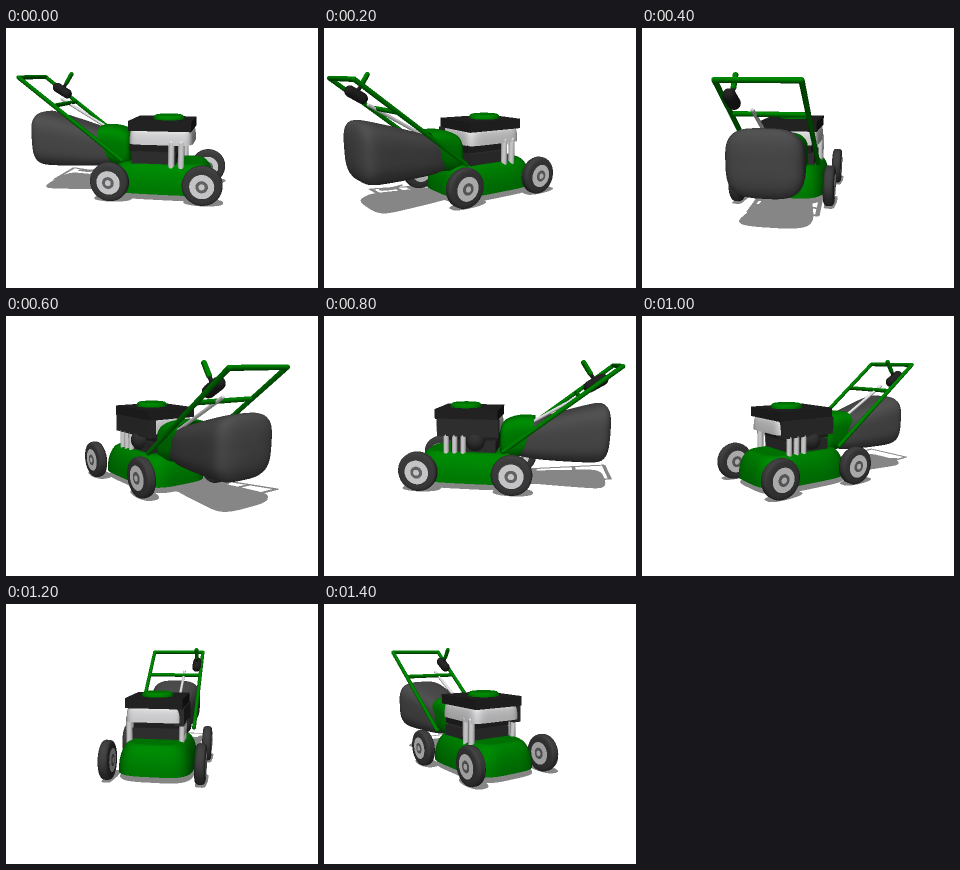
An HTML page with a canvas for the animation above (1.6 s loop, 312x260 px).

```html
<!DOCTYPE html>
<html lang="en">
<head>
<meta charset="utf-8">
<title>Turning lawn mower</title>
<style>
html, body { margin: 0; width: 100%; height: 100%; overflow: hidden; background: #fff; }
canvas { display: block; width: 312px; height: 260px; }
</style>
</head>
<body>
<canvas id="stage" width="312" height="260"></canvas>
<script>
(() => {
const W = 312, H = 260, SS = 2, POSES = 8, HOLD = 200;
const GREEN = [0, 142, 4], SILVER = [240, 240, 242], grey = v => [v, v, v];
const BLACK = grey(42), DARK = grey(56), TYRE = grey(70), BAG = grey(84), HUB = grey(120), SHADOW = grey(134);

// Model points are [forward, up, right].
const sub = (p, q) => p.map((v, k) => v - q[k]);
const mix = (p, q, t) => p.map((v, k) => v + (q[k] - v) * t);
const dot = (p, q) => p[0] * q[0] + p[1] * q[1] + p[2] * q[2];
const cross = (p, q) => [p[1] * q[2] - p[2] * q[1], p[2] * q[0] - p[0] * q[2], p[0] * q[1] - p[1] * q[0]];
const unit = p => { const l = Math.hypot(...p) || 1; return p.map(v => v / l); };
const steps = (n, f) => Array.from({ length: n + 1 }, (_, i) => f(i / n));
const faces = [];

// Smooth-shaded grid of points, its normals pointing away from c.
function patch(grid, col, c) {
  const normals = new Map(), tris = [];
  for (let i = 0; i < grid.length - 1; i++) {
    for (let j = 0; j < grid[i].length - 1; j++) {
      const p = grid[i][j], q = grid[i + 1][j], r = grid[i + 1][j + 1], s = grid[i][j + 1];
      for (const t of [[p, q, r], [p, r, s]]) {
        let n = cross(sub(t[1], t[0]), sub(t[2], t[0]));
        if (dot(n, sub(t[0], c)) < 0) n = n.map(v => -v);
        for (const v of t) {
          const m = normals.get(v) || [0, 0, 0];
          normals.set(v, m.map((x, k) => x + n[k]));
        }
        tris.push(t);
      }
    }
  }
  for (const t of tris) faces.push({ pts: t, normals: t.map(v => unit(normals.get(v))), col });
}

// Closed ring; e = 1 is an ellipse, smaller is squarer.
function ring(count, e, place) {
  const pow = v => Math.sign(v) * Math.abs(v) ** e, pts = [];
  for (let i = 0; i < count; i++) {
    const t = (i + 0.5) / count * 2 * Math.PI;
    pts.push(place(pow(Math.cos(t)), pow(Math.sin(t))));
  }
  pts.push(pts[0]);
  return pts;
}

function box(lo, hi, col) {
  for (let k = 0; k < 3; k++) {
    for (const e of [lo, hi]) {
      const i = (k + 1) % 3, j = (k + 2) % 3;
      const at = (u, v) => { const p = []; p[k] = e[k]; p[i] = u[i]; p[j] = v[j]; return p; };
      patch([[at(lo, lo), at(lo, hi)], [at(hi, lo), at(hi, hi)]], col, mix(lo, hi, 0.5));
    }
  }
}

// Upright slab standing on its base point, its upper edge rounded off by `soft`.
function slab([a, h, b], tall, ra, rb, soft, e, col) {
  const level = (y, fa, fb) => ring(40, e, (x, z) => [a + x * fa, h + y, b + z * fb]);
  const rows = steps(8, t => {
    const turn = t * Math.PI / 2, cut = soft * (1 - Math.cos(turn));
    return level(tall * Math.sin(turn), ra - cut, rb - cut);
  });
  patch([...rows, level(tall, 0, 0)], col, [a, h + tall / 2, b]);
}

// Sack lying along the mower from a0 to a blunt end at a1; shape(u) gives middle, half height, half width.
function sack(a0, a1, shape, col) {
  const rows = steps(20, t => {
    const u = 1 - (1 - t) ** 3, end = (1 - u ** 20) ** 0.4, [mid, rh, rb] = shape(u);
    return ring(40, 0.6, (x, y) => [a0 + (a1 - a0) * u, mid + y * rh * end, -2 + x * rb * end]);
  });
  patch(rows, col, [(a0 + a1) / 2, shape(0.5)[0], -2]);
}

function ball(c, r, col) {
  const rows = steps(10, t => {
    const w = r * Math.sin(t * Math.PI), y = r * Math.cos(t * Math.PI);
    return ring(18, 1, (x, z) => [c[0] + x * w, c[1] + y, c[2] + z * w]);
  });
  patch(rows, col, c);
}

// Rod with round ends.
function rod(p, q, r, col) {
  const axis = unit(sub(q, p));
  const u = unit(cross(axis, Math.abs(axis[1]) > 0.9 ? [1, 0, 0] : [0, 1, 0])), v = cross(axis, u);
  const end = o => ring(14, 1, (x, y) => o.map((m, k) => m + r * (x * u[k] + y * v[k])));
  patch([end(p), end(q)], col, mix(p, q, 0.5));
  ball(p, r, col);
  ball(q, r, col);
}

function wheel(a, b) {
  const c = [a, 18, b];
  const round = (r, o) => ring(32, 1, (x, y) => [a + x * r, 18 + y * r, b + o]);
  patch(ring(14, 0.6, (x, y) => [13 + 5.2 * x, 4.6 * y]).map(([r, o]) => round(r, o)), TYRE, c);
  for (const side of [1, -1]) {
    [SILVER, HUB, SILVER].forEach((col, i) => {
      const o = side * (4.7 + 0.3 * i);
      patch([round(11 / 2 ** i, o), round(0, o)], col, c);
    });
  }
}

// Deck and wheels
slab([5, 6, -2.5], 27, 49, 35, 12, 0.5, GREEN);
for (const a of [46, -39]) for (const b of [38.5, -45.5]) wheel(a, b);

// Engine
box([-22, 32, -24], [20, 43, 22], DARK);
box([-24, 44, -22], [22, 52, 20], BLACK);
slab([5, 51, -1], 13, 30, 26.5, 2, 0.3, SILVER);
box([-25, 48, -28.5], [32, 64, -20], DARK);
box([-24, 63.5, -27.5], [34, 72.5, 24.5], BLACK);
slab([10, 72, -1], 4.5, 15, 15, 3, 1, GREEN);
for (const a of [16, 25]) rod([a, 30, 23], [a, 53, 23], 3, SILVER);
for (const a of [8, 16, 24]) rod([a, 32, -26], [a, 49, -26], 2.6, SILVER);
ball([-3, 43, -23], 9, DARK);

// Chute and grass bag
sack(-56, -24, u => [49 - 6 * u, 16 + 3 * Math.sin(u * Math.PI), 20], GREEN);
sack(-43, -124, u => [42 + 11 * u, 14 + 14 * u ** 0.7, 18 + 13 * u ** 0.7], BAG);
rod([-102, 89, -13], [-46, 56, -13], 1.5, SILVER);

// Handle
const left = -32, right = 27;
const arm = (t, b) => [...mix([-127, 111], [-30, 36], t), b];
for (const b of [left, right]) rod(arm(0, b), arm(1, b), 2, GREEN);
for (const t of [0, 0.34]) rod(arm(t, left), arm(t, right), 2, GREEN);
rod([-112, 100, -27], [-102, 94, -27], 5, BLACK);
rod([-107, 98, -27], [-102, 105, -27], 1.6, BLACK);
rod([-102, 105, -27], [-96, 114, -27], 2.1, GREEN);

const LIGHT = unit([-0.13, 1, 0.5]), EYE = [0, 0.24, 0.97];

function canvas(w, h) {
  const c = document.createElement("canvas");
  c.width = w; c.height = h;
  return c;
}

function render(turn) {
  const co = Math.cos(turn), si = Math.sin(turn), w = W * SS, h = H * SS;
  const big = canvas(w, h), bctx = big.getContext("2d");
  const img = bctx.createImageData(w, h), px = img.data.fill(255);
  const near = new Float32Array(w * h);

  const spin = p => [p[0] * co + p[2] * si, p[1], p[2] * co - p[0] * si];
  const project = ([x, y, z]) => {
    const s = 1 / (1 - (z * 0.97 + y * 0.24) / 430);
    return [(152.5 + x * s) * SS, (150 + (13.4 + 0.24 * z - 0.97 * y) * s) * SS, s];
  };
  const shade = n => 0.34 + 0.42 * Math.max(0, dot(n, LIGHT)) + 0.3 * Math.max(0, dot(n, EYE));

  // Without `lit` the triangle is flat colour and ignores depth.
  function fill([A, B, C], col, lit) {
    const den = (B[1] - C[1]) * (A[0] - C[0]) + (C[0] - B[0]) * (A[1] - C[1]);
    if (Math.abs(den) < 1e-6) return;
    const span = (k, max) => [
      Math.max(0, Math.floor(Math.min(A[k], B[k], C[k]))),
      Math.min(max - 1, Math.ceil(Math.max(A[k], B[k], C[k])))];
    const [x0, x1] = span(0, w), [y0, y1] = span(1, h);
    for (let y = y0; y <= y1; y++) {
      for (let x = x0; x <= x1; x++) {
        const dx = x + 0.5 - C[0], dy = y + 0.5 - C[1];
        const u = ((B[1] - C[1]) * dx + (C[0] - B[0]) * dy) / den;
        const v = ((C[1] - A[1]) * dx + (A[0] - C[0]) * dy) / den;
        const t = 1 - u - v;
        if (u < 0 || v < 0 || t < 0) continue;
        const k = y * w + x;
        let f = 1;
        if (lit) {
          const z = u * A[2] + v * B[2] + t * C[2];
          if (z <= near[k]) continue;
          near[k] = z;
          f = u * lit[0] + v * lit[1] + t * lit[2];
        }
        for (let i = 0; i < 3; i++) px[k * 4 + i] = col[i] * f;
      }
    }
  }

  const world = faces.map(f => f.pts.map(spin));
  for (const t of world) fill(t.map(([x, y, z]) => project([x + 0.13 * y, 0, z - 0.5 * y])), SHADOW);
  faces.forEach((f, i) => fill(world[i].map(project), f.col, f.normals.map(n => shade(spin(n)))));

  bctx.putImageData(img, 0, 0);
  const out = canvas(W, H), octx = out.getContext("2d");
  octx.imageSmoothingQuality = "high";
  octx.drawImage(big, 0, 0, W, H);
  return out;
}

const poses = Array.from({ length: POSES }, (_, i) => render((i * 45 - 10) * Math.PI / 180));
const stage = document.getElementById("stage").getContext("2d");
const start = performance.now();

function play(now) {
  const step = Math.floor(Math.max(0, now - start) / HOLD) % POSES;
  stage.drawImage(poses[step], 0, 0);
  requestAnimationFrame(play);
}
play(start);
})();
</script>
</body>
</html>
```
